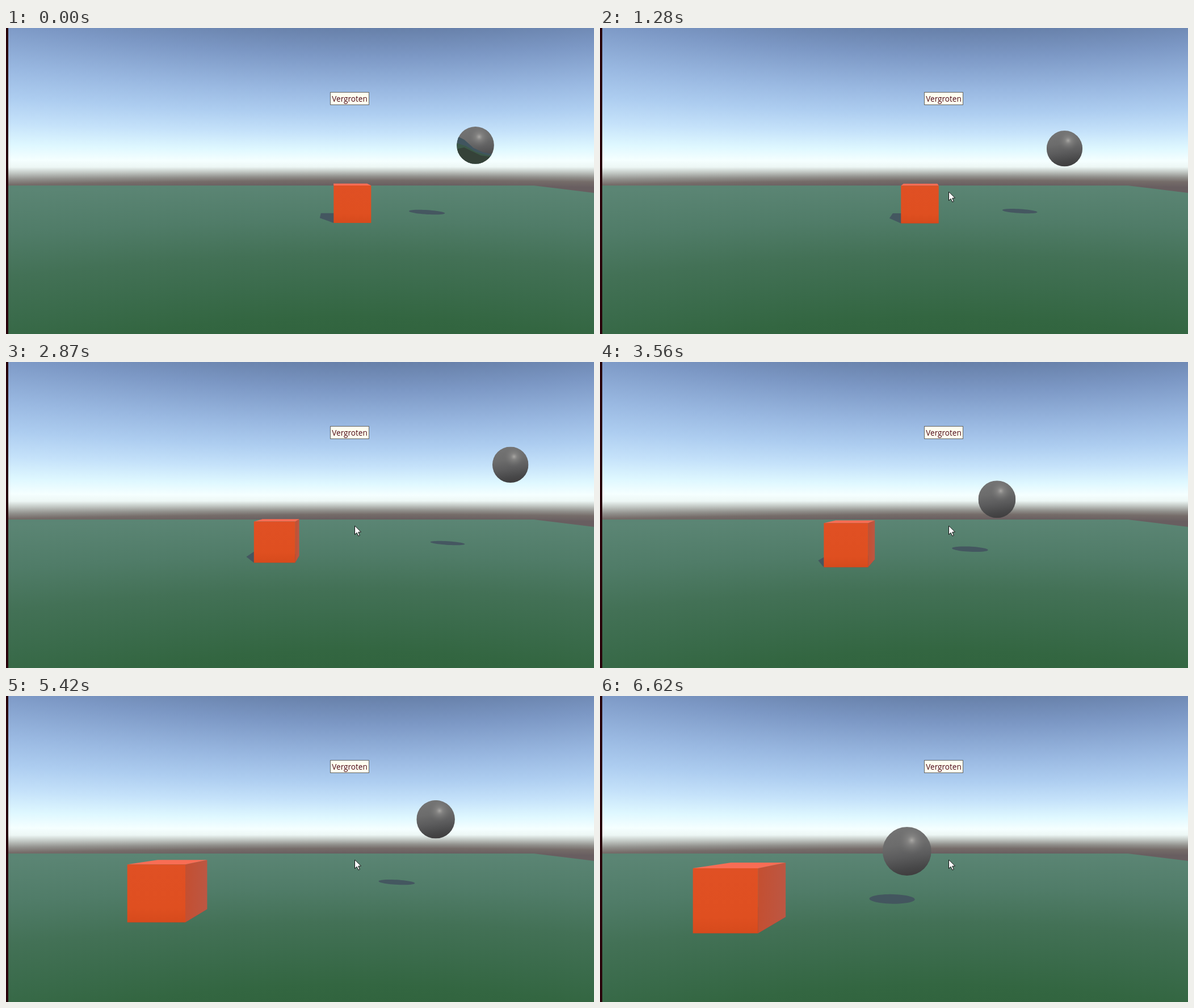
Write an HTML page with a canvas that moves like this. It is 1036 px wide and 540 px high and loops after 6.69 s.

```html
<!DOCTYPE html>
<html lang="nl">
<head>
<meta charset="utf-8">
<style>
html, body { margin: 0; width: 100%; height: 100%; overflow: hidden; background: #28000a }
canvas { position: absolute; left: 0; top: 0 }
#tip {
  position: absolute; left: 571px; top: 113px; width: 67px; height: 21px;
  border: 1px solid #66645f; background: #fffff0; color: #4d0714;
  font: 13.6px/22px "Open Sans", "Noto Sans", sans-serif; text-align: center; white-space: nowrap;
}
</style>
</head>
<body>
<canvas id="stage" width="1036" height="540"></canvas>
<div id="tip">Vergroten</div>
<script>
const W = 1036, H = 540, LOOP = 6690, STEP = 66.9;
const ctx = document.getElementById('stage').getContext('2d');

// Camera: vanishing point, focal length, ground below the eye (y points down)
const VX = 574, VY = 243, F = 585, GROUND = 1.53, MID = 1.03;
const project = ([x, y, z]) => [VX + x * F / z, VY + y * F / z];
const mix = (a, b, u) => a.map((v, i) => v + (b[i] - v) * u);

function poly(c, pts, fill) {
  c.beginPath();
  pts.forEach(p => c.lineTo(...p));
  c.closePath();
  c.fillStyle = fill;
  c.fill();
}

// Columns whose gradient flattens with the viewing angle, as a dome and a plane do
function columns(c, stops, axis, focal) {
  for (let x = 0; x < W; x += 4) {
    const s = Math.hypot(focal, x - axis) / focal;
    const y0 = VY - VY * s, y1 = VY + (H - VY) * s;
    const g = c.createLinearGradient(0, y0, 0, y1);
    for (const [y, color] of stops) g.addColorStop(y / H, color);
    c.fillStyle = g;
    c.fillRect(x, 0, 4, H);
  }
}

function makeScene() {
  const cv = document.createElement('canvas');
  cv.width = W; cv.height = H;
  const c = cv.getContext('2d');
  columns(c, [
    [0, '#6780a9'], [50, '#7c98c5'], [110, '#99b8e1'], [150, '#adcdf0'], [185, '#c5e2fa'],
    [215, '#dff8ff'], [235, '#f5ffff'], [245, '#edf7f5'], [253, '#c3c9c5'], [262, '#91908c'],
    [269, '#756c69'], [278, '#685e60'], [540, '#685e60']
  ], 660, 800);
  c.save();
  c.beginPath();
  [[0, 278], [930, 278], [W, 291], [W, H], [0, H]].forEach(p => c.lineTo(...p));
  c.clip();
  columns(c, [
    [0, '#5b8574'], [278, '#5b8574'], [340, '#507c68'], [400, '#437156'],
    [460, '#3a6b4b'], [510, '#336641'], [540, '#31643e']
  ], 600, 800);
  c.restore();
  c.fillStyle = '#28000a';
  c.fillRect(0, 0, 4, H);
  return cv;
}

// Cube: time, x of centre, z of front face
const KEYS = [
  [0, .55, 8.86], [530, .55, 8.86], [1280, -.16, 8.8], [2210, -1.04, 8.48], [3560, -1.81, 7.5],
  [4560, -2.84, 6.6], [4740, -3.01, 6.42], [5420, -3.02, 5.72], [6050, -3.07, 5.09], [LOOP, -3.07, 5.09]
];
function cubeAt(t) {
  const i = KEYS.findIndex(k => k[0] > t), a = KEYS[i - 1], b = KEYS[i];
  return mix(a, b, (t - a[0]) / (b[0] - a[0])).slice(1);
}

// Ball: flies from the cube to a fixed end point at constant speed, then starts again
const END = [4.95, -.97, 9.2], REST = [3.85, -.55, 8.9], SPEED = 5.03, PLAY = 280;
const LAUNCHES = [550, 1627, 2858, 4307, 6030];
function ballAt(t) {
  const start = LAUNCHES.filter(s => s <= t).pop() ?? PLAY;
  let from = REST;
  if (start > PLAY) {
    const [x, z] = cubeAt(start);
    from = [x, MID, z + .5];
  }
  const dist = Math.hypot(...from.map((v, i) => END[i] - v));
  return mix(from, END, Math.min(1, Math.max(0, t - start) / 1000 * SPEED / dist));
}

function drawShadows([cx, z], [bx, by, bz]) {
  const color = 'rgba(66,78,94,.8)';
  const ground = (x, d) => project([x, GROUND, d]);
  const l = cx - .5, r = cx + .5;
  poly(ctx, [ground(l, z), ground(l - .4, z + .84), ground(l - .4, z + 1.84),
    ground(r - .4, z + 1.84), ground(r, z + 1), ground(r, z)], color);
  const drop = GROUND - by, sx = bx - .35 * drop, sz = bz + 1.15 * drop - .35;
  const ring = [];
  for (let a = 0; a < 6.28; a += .13)
    ring.push(ground(sx + .53 * Math.cos(a) - .1 * Math.sin(a), sz + .57 * Math.sin(a)));
  poly(ctx, ring, color);
}

function drawBall(pos, mirrored) {
  const [x, y] = project(pos), r = F / pos[2] / 2;
  ctx.save();
  ctx.translate(x, y);
  ctx.scale(r, r);
  ctx.beginPath();
  ctx.arc(0, 0, 1, 0, 7);
  ctx.clip();
  let g = ctx.createLinearGradient(-.15, -1, .15, 1);
  [[0, '#747474'], [.35, '#6c6c6c'], [.6, '#5c5c5d'], [.85, '#474748'], [1, '#3f3d3e']]
    .forEach(s => g.addColorStop(...s));
  ctx.fillStyle = g;
  ctx.fillRect(-1, -1, 2, 2);
  if (mirrored) {
    poly(ctx, [[-1, -.5], [-.6, -.3], [-.1, .15], [.4, .38], [1, .5], [1, 1], [-1, 1]], '#40555f');
    poly(ctx, [[-1, -.12], [-.5, .05], [0, .35], [.5, .5], [1, .58], [1, 1], [-1, 1]], '#3b5848');
    poly(ctx, [[-1, .2], [-.6, .12], [-.2, .32], [.3, .55], [1, .65], [1, 1], [-1, 1]], '#354239');
  }
  g = ctx.createRadialGradient(.2, -.45, 0, .2, -.45, .6);
  g.addColorStop(0, 'rgba(190,188,184,.75)');
  g.addColorStop(.3, 'rgba(150,149,147,.5)');
  g.addColorStop(1, 'rgba(110,110,110,0)');
  ctx.fillStyle = g;
  ctx.fillRect(-1, -1, 2, 2);
  ctx.restore();
}

function drawCubeAndBall([cx, z], ball, mirrored) {
  const p = (dx, dy, dz) => project([cx + dx, MID + dy, z + dz]);
  const [a, b, c, d] = [p(-.5, -.5, 0), p(.5, -.5, 0), p(.5, .5, 0), p(-.5, .5, 0)];
  const [e, f, g] = [p(-.5, -.5, 1), p(.5, -.5, 1), p(.5, .5, 1)];
  if (f[0] > b[0]) {
    const side = ctx.createLinearGradient(b[0], 0, f[0], 0);
    side.addColorStop(0, '#c44f31');
    side.addColorStop(1, '#bc5743');
    poly(ctx, [b, f, g, c], side);
  }
  // Only the part of the ball outside the right-hand face shows
  ctx.save();
  if (ball[0] < cx + 1) {
    ctx.beginPath();
    ctx.rect(project([cx + .5, 0, ball[2]])[0], 0, W, H);
    ctx.clip();
  }
  drawBall(ball, mirrored);
  ctx.restore();
  poly(ctx, [a, e, f, b], '#f86d55');
  const face = ctx.createLinearGradient(0, a[1], 0, d[1]);
  face.addColorStop(0, '#e05024');
  face.addColorStop(.75, '#df4f20');
  face.addColorStop(1, '#d64a1c');
  poly(ctx, [a, b, c, d], face);
}

function drawCursor() {
  ctx.save();
  ctx.translate(614.5, 289);
  poly(ctx, [[0, 0], [0, 15.5], [3.6, 12.2], [6.3, 18], [8.8, 17], [6.2, 11.3], [11, 11]], '#fff');
  ctx.strokeStyle = '#111';
  ctx.lineWidth = 1;
  ctx.stroke();
  ctx.restore();
}

const scene = makeScene();
function draw(now) {
  const t = Math.floor(now % LOOP / STEP + .06) % 100 * STEP + 6;
  const cube = cubeAt(t), ball = ballAt(t), playing = t >= PLAY;
  ctx.drawImage(scene, 0, 0);
  drawShadows(cube, ball);
  drawCubeAndBall(cube, ball, !playing);
  if (playing) drawCursor();
  requestAnimationFrame(draw);
}
requestAnimationFrame(draw);
</script>
</body>
</html>
```
